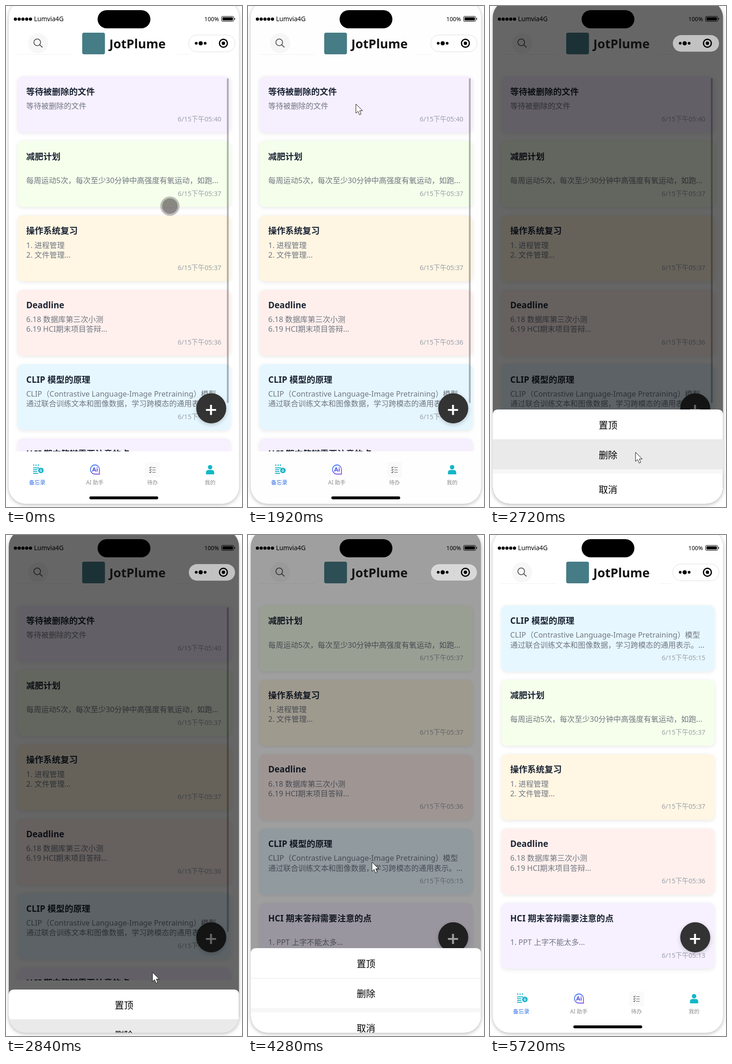
Recreate the animation shown at these times as an HTML page. Size 514 px wide and 1089 px high, loop 6240 ms.

```html
<!DOCTYPE html>
<html lang="zh-CN">
<head>
<meta charset="utf-8">
<title>Memo list</title>
<style>
html, body { margin: 0; width: 100%; height: 100%; overflow: hidden; background: #fff; }
svg { display: block; width: 514px; height: 1089px; }
text { font-family: 'Noto Sans', 'Noto Sans CJK SC', 'Noto Sans CJK', sans-serif; white-space: pre; }
.title { font-size: 18.7px; font-weight: 700; fill: #1b2433; }
.body { font-size: 16.4px; fill: #717782; }
.date { font-size: 14.3px; fill: #9ca1ab; text-anchor: end; }
.tab { font-size: 11.8px; fill: #8e8e8e; text-anchor: middle; }
.row { font-size: 20.3px; fill: #000; text-anchor: middle; }
.tip { font-size: 16.4px; fill: #eee; text-anchor: middle; }
.card { filter: drop-shadow(0 2px 4px rgba(0, 0, 0, .09)); }
.fab { filter: drop-shadow(0 3px 5px rgba(0, 0, 0, .2)); }
.phone { filter: drop-shadow(0 2px 4px rgba(0, 0, 0, .28)); }
</style>
</head>
<body>
<svg viewBox="0 0 514 1089">
  <defs>
    <clipPath id="body"><rect x="6" y="-12" width="501.500" height="1094" rx="37"/></clipPath>
    <clipPath id="view"><rect x="6" y="120" width="502" height="847.500"/></clipPath>
    <linearGradient id="violet" x1="0" x2="1" y2="1">
      <stop offset="0" stop-color="#2f8df5"/><stop offset="1" stop-color="#8a45e6"/>
    </linearGradient>
  </defs>
  <rect class="phone" x="6" y="-12" width="501.500" height="1094" rx="37" fill="#fff"/>

  <g clip-path="url(#body)">
    <path d="M24 105.500H146M368 105.500H398" stroke="#f1f1f1"/>
    <circle cx="70" cy="81" r="22" fill="#f7f7f7"/>
    <g fill="none" stroke="#555" stroke-width="1.800" stroke-linecap="round">
      <circle cx="68" cy="79" r="7.300"/><path d="M73.500 84.500L79 89.500"/>
    </g>
    <rect x="166" y="58" width="49.500" height="47" rx="4" fill="#467c86"/>

    <g id="lists" clip-path="url(#view)"></g>

    <g class="fab"><circle cx="447" cy="874.500" r="32.700" fill="#333"/></g>
    <path d="M435.500 878H457.500M446.500 867V889" stroke="#fff" stroke-width="4.200"/>

    <g id="tabs">
      <g fill="none" stroke="#22b8cc" stroke-width="1.800">
        <path d="M60.500 996V1000M65.500 996V1000M70.500 996V1000M59 1004H72M59 1008H68M59 1012H68M59 1016H70"/>
      </g>
      <circle cx="76" cy="1009.500" r="6" fill="#17b3c9"/>
      <path d="M76 1006V1010M73.500 1009.500Q76 1014 78.500 1009.500" fill="none" stroke="#fff" stroke-width="1.300"/>
      <path d="M194 997.500A10 10 0 1 0 194 1017.500H203.500V1007.500A9.700 10 0 0 0 194 997.500Z" fill="#fff" stroke="url(#violet)" stroke-width="1.800"/>
      <text x="194" y="1012" font-size="13" font-weight="700" fill="#4b4fe0" text-anchor="middle">Ai</text>
      <rect x="303" y="992" width="32" height="33" fill="#fafafa"/>
      <path d="M312.500 1003L314 1004.500L316.500 1001.500M312.500 1008L314 1009.500L316.500 1006.500M312.500 1013L314 1014.500L316.500 1011.500M318.500 1003.500H326M318.500 1008.500H326M318.500 1013.500H326" fill="none" stroke="#555" stroke-width="1.200"/>
      <circle cx="444.500" cy="1002.500" r="4.800" fill="#12b7c8"/>
      <path d="M435.500 1018V1014.500Q435.500 1008.500 441 1008.500H448Q453.500 1008.500 453.500 1014.500V1018Z" fill="#12b7c8"/>
    </g>
    <rect x="181.500" y="1066" width="150" height="6.200" rx="3.100" fill="#000"/>

    <rect id="mask" x="0" y="-12" width="514" height="1101" opacity="0"/>

    <text x="225" y="92" font-size="27" font-weight="700" fill="#111">JotPlume</text>

    <g id="toast" opacity="0">
      <rect x="187" y="412.500" width="140" height="140" rx="5" fill="#4c4c4c"/>
      <path d="M234.500 468L250.500 484.500L282.500 452.500" fill="none" stroke="#fff" stroke-width="5"/>
      <text id="deleted" class="tip" x="257" y="522">已删除</text>
      <text id="pinned" class="tip" x="257" y="522">已置顶</text>
    </g>

    <g id="sheet" transform="translate(0 212)">
      <path d="M6 1090V889Q6 877 18 877H495.500Q507.500 877 507.500 889V1090Z" fill="#fff"/>
      <path id="press1" d="M6 942V889Q6 877 18 877H495.500Q507.500 877 507.500 889V942Z" fill="#eaeaea" opacity="0"/>
      <rect id="press2" x="6" y="942" width="502" height="65" fill="#eaeaea" opacity="0"/>
      <path d="M6 942.500H508" stroke="#e6e6e6"/>
      <rect x="6" y="1007" width="502" height="9.500" fill="#f7f7f7"/>
      <text class="row" x="257" y="918.500">置顶</text>
      <text class="row" x="257" y="984">删除</text>
      <text class="row" x="257" y="1059">取消</text>
    </g>
  </g>

  <g id="status">
    <rect x="199.500" y="9" width="115" height="39.500" rx="19.750"/>
    <text x="61" y="32.500" font-size="13.700">Lumvia4G</text>
    <text x="432" y="33" font-size="12.500">100%</text>
    <rect x="469.500" y="22.500" width="26.500" height="11" rx="2.500" fill="none" stroke="#000"/>
    <rect x="471.500" y="24.500" width="22.500" height="7" rx="1"/>
    <path d="M497.500 26H498.500Q499.500 28 498.500 30H497.500Z"/>
    <rect x="398" y="63" width="101" height="36.500" rx="18.250" fill="#fff" fill-opacity=".6" stroke="#000" stroke-opacity=".13"/>
    <path d="M448.500 72V90" stroke="#000" stroke-opacity=".05"/>
    <circle cx="414.300" cy="81" r="3"/><circle cx="424" cy="81" r="4.600"/><circle cx="433.700" cy="81" r="3"/>
    <circle cx="473.500" cy="81" r="8.600" fill="none" stroke="#000" stroke-width="2.700"/><circle cx="473.500" cy="81" r="3.700"/>
  </g>

  <g id="cursor">
    <g id="touch">
      <circle r="21" fill="#4a4a4a" fill-opacity=".34"/>
      <circle r="16.800" fill="#3c3432" fill-opacity=".4"/>
    </g>
    <path id="arrow" transform="translate(-6 -7)" d="M0 0V20L4.600 15.800L7.800 23.500L11.300 22L8.200 14.600H14.500Z" fill="#fff" stroke="#111" stroke-linejoin="round"/>
  </g>
</svg>
<script>
const LOOP = 6240;
const $ = id => document.getElementById(id);

function add(parent, tag, attrs, text) {
  const el = document.createElementNS('http://www.w3.org/2000/svg', tag);
  for (const k in attrs) el.setAttribute(k, attrs[k]);
  if (text) el.textContent = text;
  return parent.appendChild(el);
}

// Notes: colour, title, body lines, time of day
const notes = {
  trash: ['#f7f0ff', '等待被删除的文件', ['等待被删除的文件'], '05:40'],
  diet: ['#f5ffeb', '减肥计划', ['', '每周运动5次，每次至少30分钟中高强度有氧运动，如跑...'], '05:37'],
  os: ['#fff6e3', '操作系统复习', ['1. 进程管理', '2. 文件管理...'], '05:37'],
  due: ['#fff0ed', 'Deadline', ['6.18 数据库第三次小测', '6.19 HCI期末项目答辩...'], '05:36'],
  clip: ['#e6f7ff', 'CLIP 模型的原理', ['CLIP（Contrastive Language-Image Pretraining）模型', '通过联合训练文本和图像数据，学习跨模态的通用表示。...'], '05:15'],
  hci: ['#f7f0ff', 'HCI 期末答辩需要注意的点', ['', '1. PPT 上字不能太多...'], '05:13']
};

function list(keys) {
  const g = add($('lists'), 'g');
  let y = 153;
  for (const key of keys) {
    const [fill, title, lines, time] = notes[key];
    const h = 100.8 + 21.2 * lines.length;
    add(g, 'rect', { class: 'card', x: 25, y, width: 464, height: h, rx: 12, fill });
    add(g, 'text', { class: 'title', x: 44, y: y + 40 }, title);
    lines.forEach((s, i) => s && add(g, 'text', { class: 'body', x: 44, y: y + 70.3 + 21.2 * i }, s));
    add(g, 'text', { class: 'date', x: 469, y: y + h - 24.2 }, '6/15下午' + time);
    y += h + 18.5;
  }
  return g;
}

const full = list(['trash', 'diet', 'os', 'due', 'clip', 'hci']);
add(full, 'rect', { x: 481, y: 157, width: 4, height: 706, rx: 2, fill: '#000', 'fill-opacity': .28 });
const trimmed = list(['diet', 'os', 'due', 'clip', 'hci']);
const sorted = list(['clip', 'diet', 'os', 'due', 'hci']);

['备忘录', 'AI 助手', '待办', '我的'].forEach((s, i) => {
  const el = add($('tabs'), 'text', { class: 'tab', x: 68 + 125.5 * i, y: 1039.5 }, s);
  if (!i) el.style.fill = '#2f6fe8';
});
for (let i = 0; i < 5; i++) add($('status'), 'circle', { cx: 20.5 + 8.2 * i, cy: 28.5, r: 3.5 });

// Steps are [ms, value, easing towards the next step]
function play(el, prop, steps) {
  const rows = [...steps];
  if (rows[0][0] > 0) rows.unshift([0, rows[0][1]]);
  const last = rows[rows.length - 1];
  if (last[0] < LOOP) rows.push([LOOP, last[1]]);
  el.animate(rows.map(([ms, v, easing = 'linear']) => ({ offset: ms / LOOP, [prop]: v, easing })),
    { duration: LOOP, iterations: Infinity });
}

// Visible only inside the given spans of ms
function show(el, ...spans) {
  const steps = spans[0][0] > 0 ? [[0, 0, 'steps(1)']] : [];
  for (const [from, to] of spans) steps.push([from, 1, 'steps(1)'], [to, 0, 'steps(1)']);
  play(el, 'opacity', steps);
}

show(full, [0, 3220]);
show(trimmed, [3220, 5200]);
show(sorted, [5200, LOOP]);
show($('toast'), [3220, 3720], [5200, 5700]);
show($('deleted'), [3220, 3720]);
show($('pinned'), [5200, 5700]);
show($('press2'), [2700, 2990]);
show($('press1'), [4740, 5050]);
show($('touch'), [0, 1920], [3200, 4160], [5040, 5720]);
show($('arrow'), [1920, 3200], [4160, 5040]);

play($('mask'), 'opacity', [
  [1920, 0], [2120, .6], [3040, .6], [3220, 0],
  [4156, 0], [4356, .6], [4840, .6], [5040, 0]
]);

const down = 'translate(0px, 212px)', up = 'translate(0px, 0px)';
play($('sheet'), 'transform', [
  [1920, down, 'ease'], [2120, up], [2780, up, 'ease'], [2980, down],
  [4156, down, 'ease'], [4356, up], [4840, up, 'ease'], [5040, down]
]);

play($('cursor'), 'transform', [
  [40, 357, 435, 'ease-in'], [150, 412, 422], [240, 430, 388], [400, 365, 308, 'ease-out'],
  [640, 241, 236], [720, 241, 220],
  [2080, 241, 220, 'ease-in-out'], [2660, 323, 977],
  [2780, 323, 977, 'ease-in-out'], [3160, 363, 605],
  [3260, 363, 605, 'ease-in-out'], [3720, 276, 718],
  [4280, 276, 718, 'ease-in-out'], [4720, 311, 912],
  [4900, 311, 912], [5360, 340, 925, 'ease-in'], [5700, 406, 1115]
].map(([ms, x, y, e]) => [ms, `translate(${x}px, ${y}px)`, e]));
</script>
</body>
</html>
```
